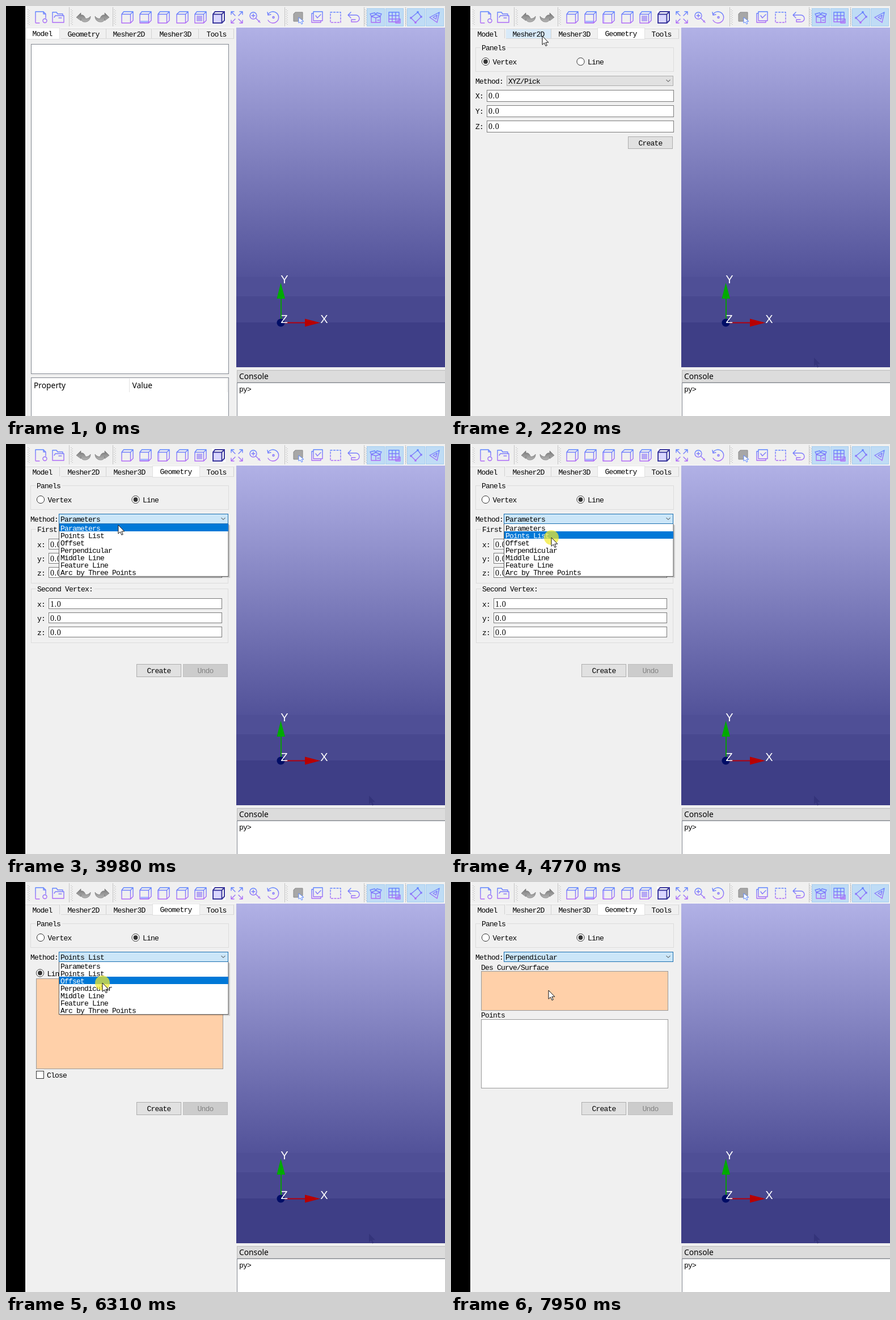
Write an HTML page that moves like this. It is 774 by 723 pixels and loops after 8000 ms.

```html
<!DOCTYPE html>
<html lang="en">
<head>
<meta charset="utf-8">
<title>Geometry panel</title>
<style>
html, body { margin: 0; width: 100%; height: 100%; overflow: hidden; background: #f0f0f0; }
svg { display: block; }
text { font: 13px "Liberation Mono", monospace; letter-spacing: -.8px; white-space: pre; }
.ui { font: 13.8px "Noto Sans", sans-serif; letter-spacing: 0; }
.axis { font: 20px "Liberation Sans", sans-serif; letter-spacing: 0; }
.num { font: 14px "Liberation Serif", serif; letter-spacing: .6px; }
.ico { fill: none; stroke: url(#ink); stroke-width: 1.4; stroke-linejoin: round; stroke-linecap: round; }
</style>
</head>
<body>
<svg width="774" height="723" viewBox="0 0 774 723">
  <defs>
    <linearGradient id="sky" x1="0" y1="0" x2="0" y2="1">
      <stop offset="0" stop-color="#b1b1e6"/><stop offset="1" stop-color="#525299"/>
    </linearGradient>
    <linearGradient id="ink" gradientUnits="userSpaceOnUse" x1="0" y1="-11" x2="0" y2="11">
      <stop offset="0" stop-color="#5a86ff"/><stop offset="1" stop-color="#b468f6"/>
    </linearGradient>
    <linearGradient id="steel" gradientUnits="userSpaceOnUse" x1="0" y1="-8" x2="0" y2="8">
      <stop offset="0" stop-color="#777"/><stop offset="1" stop-color="#b4b4b4"/>
    </linearGradient>
    <clipPath id="drop"><rect x="93" y="141" width="303" height="100"/></clipPath>
    <clipPath id="label"><rect x="43" y="300" width="63" height="60"/></clipPath>
  </defs>
  <g id="base"></g>
  <g id="live"></g>
</svg>
<script>
const LOOP = 8000;
const ORANGE = '#ffd0a9', EDGE = '#7a7a7a', BOX = '#828790', FAINT = '#dcdcdc';
const ARROW = 'M0 0V15.3L3.5 12 6 17.5 8.3 16.5 5.9 11.2H10.8Z';
const METHODS = ['Parameters', 'Points List', 'Offset', 'Perpendicular',
  'Middle Line', 'Feature Line', 'Arc by Three Points'];

const $ = id => document.getElementById(id);
const fill = (x, y, w, h, c) => `<rect x="${x}" y="${y}" width="${w}" height="${h}" fill="${c}"/>`;
const rect = (x, y, w, h, c, s) =>
  `<rect x="${x + .5}" y="${y + .5}" width="${w}" height="${h}" fill="${c}" stroke="${s}"/>`;
const text = (x, y, s, c = '#000', more = '') => `<text x="${x}" y="${y}" fill="${c}" ${more}>${s}</text>`;
const path = (d, more) => `<path d="${d}" ${more}/>`;
const at = (x, y, s) => `<g transform="translate(${x} ${y})">${s}</g>`;
const mid = 'text-anchor="middle"';
const between = (t, a, b) => t >= a && t < b;

// ---- fixed parts ----

const FRONT = 'M-10-5.5H5.5V10H-10Z', BACK = 'M-10-5.5L-6.5-10H10V5.5L5.5 10M5.5-5.5L10-10';

function icons() {
  const ico = (x, d, extra = '') => at(x, 20, extra + path(d, 'class="ico"'));
  const cube = (x, extra) => ico(x, FRONT + BACK, extra);
  const grey = (x, flip) => at(x, 20, `<g transform="scale(${flip} 1)">` +
    path('M-13 0L-5-8V-4C-1-5 2-2 3 2C6 3 10 1 12-2C12 5 7 9 0 8C-4 7-5 4-5 2V6Z',
      'fill="url(#steel)" stroke="#6f6f6f" stroke-width=".6"') + '</g>');
  let s = ico(62, 'M-3 10H-9Q-10 10-10 9V-10H4L8-6V1M4-10V-6H8M3 6A3.5 3.5 0 1 0 10 6A3.5 3.5 0 1 0 3 6');
  s += ico(92, 'M-10 9V-9H-3L-1-6H8V-3M-10 9H10V-3H-5L-7 0M1 1H6');
  s += grey(137, 1) + grey(169, -1);
  s += cube(214, '') + cube(246, fill(-9, 6, 14, 4, '#a9b6ff')) + cube(278, fill(-10, -5, 3, 15, '#d8ccff'));
  s += ico(311, 'M-10-5.5H5.5V10H-10ZM-10-5.5L-5-10H10V6L5.5 10M5.5-5.5L10-10');
  s += cube(343, fill(-7, -3, 10, 10, '#b7a9f4'));
  s += at(375, 20, fill(-12, -12, 24, 24, '#fff') + fill(-10, -5, 16, 15, '#d9d6ff') +
    path(FRONT + BACK, 'fill="none" stroke="#39369a" stroke-width="2"'));
  s += ico(407, 'M-3-3L-9-9M-10-5V-10H-5M3-3L9-9M5-10H10V-5M-3 3L-9 9M-10 5V10H-5M3 3L9 9M5 10H10V5');
  s += ico(439, 'M-9-3A6 6 0 1 0 3-3A6 6 0 1 0-9-3M2 2L9 9M6 8L8 6M-6-3H0M-3-6V0');
  s += ico(471, 'M-9-5A10 10 0 1 1-9 5M-10-9L-9-4-4-5M-1 0A1.5 1.5 0 1 0 2 0A1.5 1.5 0 1 0-1 0');
  s += at(516, 20, path('M-9-6L-6-9H7V4L4 7H-9Z', 'fill="#a7a7a7" stroke="#888"') +
    path('M0 0V10L3 8 5 12 7 11 5 7H9Z', 'fill="#fff" stroke="#5a86ff"'));
  s += ico(548, 'M-6-10H10V6H-6ZM-6-7H-9V9H7V6M-2-3L1 1 7-5');
  s += at(581, 20, path('M-9-9H9V9H-9Z', 'class="ico" stroke-dasharray="3 2.5"'));
  s += ico(613, 'M-5-9L-10-4-5 1M-10-4H4A5 5 0 0 1 4 8H-4V4H3');
  s += ico(652, 'M-8-2V9H8V-2M-8-2L0 1 8-2 10-6 2-8 0-5-2-8-10-6ZM0 1V9M0-5L-8-2M0-5L8-2M3 5H6');
  s += ico(685, 'M-10-9H8V8H-10ZM-10-3H8M-10 3H8M-4-9V8M2-9V8M2 3H10V10H2ZM4 6H8');
  s += ico(723, 'M-9 1L3-9 9-1-1 9ZM-10 0H-8V2H-10ZM2-10H4V-8H2ZM8-2H10V0H8ZM-2 8H0V10H-2Z');
  return s + ico(756, 'M-9 0L8-9 4 9ZM-3 0L4-4 2 3Z');
}

function base() {
  let s = fill(0, 0, 774, 723, '#f0f0f0') + fill(0, 0, 34, 723, '#000');
  s += fill(34, 37, 740, 1, '#fafafa');
  for (const x of [111, 188, 491, 631, 704]) s += fill(x, 2, 1, 34, '#c4c4c4');
  for (const x of [39, 115, 191, 494, 633, 705])
    s += path(`M${x} 6V34M${x + 2} 8V34`, 'stroke="#a5a5a5" stroke-dasharray="1 3"');
  for (const x of [636, 669, 707, 740]) s += rect(x, 4, 31, 31, '#bfdcf5', '#a4cdf0');
  s += icons();
  s += fill(406, 38, 368, 440, 'url(#sky)') + fill(406, 478, 368, 34, '#4f4f96') +
    fill(406, 512, 368, 46, '#48488f') + fill(406, 558, 368, 79, '#3e3e86');
  s += fill(484, 510, 2, 48, '#0a9c0a') + path('M484.5 488L492 516H477.5Z', 'fill="#00aa00"') +
    fill(484, 557.5, 44, 2, '#b00010') + path('M554 558.5L527 551.5V565.5Z', 'fill="#b80000"') +
    '<circle cx="484.5" cy="558.5" r="7" fill="#000d66"/>';
  const axis = (x, y, c) => text(x, y, c, '#fff', 'class="axis" ' + mid);
  s += axis(491, 489, 'Y') + axis(490.5, 559, 'Z') + axis(561, 559, 'X');
  s += rect(407, 642, 380, 21, '#dcdcdc', '#bcbcbc') + text(411, 658, 'Console', '#000', 'class="ui"');
  return s + rect(407, 664, 380, 70, '#fff', BOX) + text(411, 680, 'py&gt;');
}

// ---- widgets ----

const field = (x, y, w, h, s) => rect(x, y, w, h, '#fff', EDGE) +
  text(x + 3, y + 14.5, s, '#000', 'class="num"');

function group(x, y, w, h, title) {
  return rect(x, y, w, h, 'none', FAINT) + fill(x + 9, y - 4, title.length * 7 + 5, 9, '#f0f0f0') +
    text(x + 11, y + 5, title);
}

function radio(x, y, label, on, hot) {
  const c = hot ? '#0067c0' : '#333';
  return `<circle cx="${x}" cy="${y}" r="6.6" fill="#fff" stroke="${c}"/>` +
    (on ? `<circle cx="${x}" cy="${y}" r="3.9" fill="${c}"/>` : '') + text(x + 12.5, y + 5, label);
}

function button(x, y, h, label, off) {
  return rect(x, y, 78, h, off ? '#ccc' : '#e1e1e1', off ? '#bfbfbf' : '#adadad') +
    text(x + 39.5, y + h / 2 + 5, label, off ? '#838383' : '#000', mid);
}

function spin(y, label, value) {
  const key = (d, v) => rect(368, y + v, 13, 9, '#f0f0f0', '#b8b8b8') + path(d, 'fill="#222"');
  return text(53, y + 15, label, '#000', 'clip-path="url(#label)"') + field(106, y, 276, 20, value) +
    key(`M371 ${y + 8}h8l-4-4z`, 1) + key(`M371 ${y + 13}h8l-4 4z`, 11);
}

const COMBO = { idle: ['#e1e1e1', '#adadad'], hot: ['#e5f1fb', '#0078d7'], down: ['#cbe6f8', '#1a6fb0'] };

function combo(x, label, state) {
  const [c, edge] = COMBO[state];
  return text(43, 137, 'Method:') + rect(x, 123, 391 - x, 17, c, edge) + text(x + 3, 137, label) +
    path('M379.5 130L383 133.5 386.5 130', 'fill="none" stroke="#333"');
}

// ---- pages ----

const modelPage = () => rect(44, 67, 348, 581, '#fff', BOX) + rect(44, 655, 348, 80, '#fff', BOX) +
  fill(217, 657, 1, 24, '#e2e2e2') + fill(390, 657, 1, 24, '#e2e2e2') +
  text(49, 673.5, 'Property', '#000', 'class="ui"') + text(222.5, 673.5, 'Value', '#000', 'class="ui"');

const vertexPage = () => ['X:', 'Y:', 'Z:'].map((n, i) =>
  text(43, 163 + 27 * i, n) + field(63, 148 + 27 * i, 329, 20, '0.0')).join('') + button(312, 230, 21, 'Create');

const corner = (y, title, x0) => group(44, y, 347, 95, title) + ['x:', 'y:', 'z:'].map((n, i) =>
  text(55, y + 32 + 25 * i, n) + field(75, y + 17 + 25 * i, 305, 18, i ? '0.0' : x0)).join('');

const linePages = [
  () => corner(150, 'First Vertex:', '0.0') + corner(255, 'Second Vertex:', '1.0'),
  () => radio(60, 160.5, 'Line', true) + rect(53, 170, 329, 159, ORANGE, '#999') +
    rect(53, 333, 13, 13, '#fff', '#333') + text(72, 345, 'Close'),
  () => rect(53, 143, 329, 162, ORANGE, '#999') + spin(308, 'Distance', '1.000000') + spin(330, 'Number', '1'),
  () => text(53, 155, 'Des Curve/Surface') + rect(53, 157, 329, 69, ORANGE, '#999') +
    text(53, 239, 'Points') + rect(53, 242, 329, 121, '#fff', '#999')
];

function popup(h, hot) {
  let s = fill(95, 143, 300, 93, '#0002') + rect(93, 140, 298.5, 93, '#fff', '#555');
  METHODS.forEach((m, i) => {
    if (i === hot) s += fill(94, 141 + 13 * i, 298, 13, '#0078d7');
    s += text(96, 152.5 + 13 * i, m, i === hot ? '#fff' : '#000');
  });
  return `<g clip-path="url(#drop)">${at(0, h - 93, s)}</g>`;
}

function tabs(t, cx, cy) {
  const dx = t < 1030 ? 0 : t < 1500 ? cx - 135 : 161;
  const sel = t < 1030 ? 'Model' : 'Geometry';
  const list = [['Model', 34, 60], ['Mesher2D', dx > 40 ? 97 : 177, 79],
    ['Mesher3D', dx > 115 ? 177 : 258, 81], ['Tools', 341, 60], ['Geometry', 97 + dx, dx > 115 ? 83 : 79]];
  let s = fill(97, 57, 305, 1, '#d9d9d9');
  for (const [name, x, w] of list) {
    const on = name === sel, hot = cx >= x && cx < x + w && between(cy, 40, 58);
    s += on ? rect(x, 38, w, 20, '#fff', '#e0e0e0')
      : fill(x, 41, w, 16, hot ? '#d8eaf9' : '#f0f0f0') + fill(x, 40, w, 1, '#dedede') + fill(x + w, 40, 1, 17, '#d2d2d2');
    s += text(x + w / 2, on ? 52.5 : 53.5, name, '#000', mid);
  }
  return s;
}

// ---- time ----

// Bursts of screen updates: first, last, count. Between bursts nothing moves.
const BURSTS = [[250, 890, 9], [1030, 1500, 7], [2220, 2970, 11], [3050, 3140, 2], [3450, 4220, 11],
  [4290, 4370, 2], [4520, 4610, 2], [4770, 4770, 1], [4920, 5700, 11], [5770, 6550, 11],
  [6630, 6780, 3], [7020, 7780, 11], [7950, 7950, 1]];

function snap(t) {
  let now = 0;
  for (const [a, b, n] of BURSTS) {
    if (t < a) break;
    const step = (b - a) / (n - 1) || 1;
    now = Math.min(b, a + Math.floor((t - a) / step + .12) * step);
  }
  return now;
}

// Pointer stops: leave time, arrival time, x, y.
const MOVES = [[0, 250, 640, 620], [250, 890, 135, 50], [1100, 1420, 252, 50], [2150, 2220, 161, 53],
  [2220, 2370, 112, 88], [2520, 2820, 245, 96], [3380, 3450, 226, 113], [3450, 3600, 205, 134],
  [3910, 4150, 177, 169], [4460, 4600, 177, 165], [4990, 5310, 182, 136], [5920, 6160, 170, 178],
  [6390, 6550, 178, 142], [6630, 6780, 184, 132], [7170, 7476, 172, 191]];

function pointer(t) {
  let x = 640, y = 620;
  for (const [a, b, px, py] of MOVES) {
    if (t < a) break;
    const k = Math.min(1, (t - a) / (b - a)), e = k * k * (3 - 2 * k);
    x += (px - x) * e;
    y += (py - y) * e;
  }
  return [x, y];
}

const CLICKS = [[1030, 1180], [2880, 3050], [3750, 3905], [4770, 4920], [5770, 5920], [6300, 6390], [7020, 7170], [7700, 7950]];
const OPEN = [[3750, 4920], [5770, 6390], [7020, 7950]];

function geometryPage(t, cx, cy) {
  const line = t >= 2960, onRow = between(cy, 88, 115);
  let s = group(43, 73, 349, 42, 'Panels') +
    radio(61, 98, 'Vertex', !line, onRow && between(cx, 54, 130)) +
    radio(228.5, 98, 'Line', line, onRow && between(cx, 222, 300));
  if (t < 3050) return s + combo(98, 'XYZ/Pick', 'idle') + vertexPage();

  const method = OPEN.filter(o => t >= o[1]).length;
  const open = OPEN.find(o => between(t, ...o));
  const age = open ? t - open[0] : 0;
  const closed = OPEN.some(o => between(t, o[1], o[1] + 100));
  const hot = between(cy, 123, 142) && between(cx, 93, 392);
  const state = closed || age > 70 ? 'down' : hot ? 'hot' : 'idle';
  s += linePages[method]() + button(230, 388, 22, 'Create') + button(312, 388, 22, 'Undo', true);
  s += combo(93, METHODS[method], state);
  if (open) s += popup(Math.min(93, 20 + age * .5), cy < 142 ? method : Math.floor((cy - 141) / 13));
  return s;
}

function draw(t) {
  const [x, y] = pointer(t);
  let s = tabs(t, x, y) + (t < 1030 ? modelPage() : geometryPage(t, x, y));
  if (t > 250) s += at(640, 620, path(ARROW, 'fill="#34347a"'));
  if (CLICKS.some(c => between(t, ...c)))
    s += `<circle cx="${x}" cy="${y}" r="13" fill="#f2ea2c" opacity=".72"/>`;
  if (t >= 250) s += at(x, y, path(ARROW, 'fill="#fff" stroke="#111"'));
  $('live').innerHTML = s;
}

$('base').innerHTML = base();
let last = -1;
function tick() {
  const t = snap(performance.now() % LOOP);
  if (t !== last) draw(last = t);
  requestAnimationFrame(tick);
}
tick();
</script>
</body>
</html>
```
